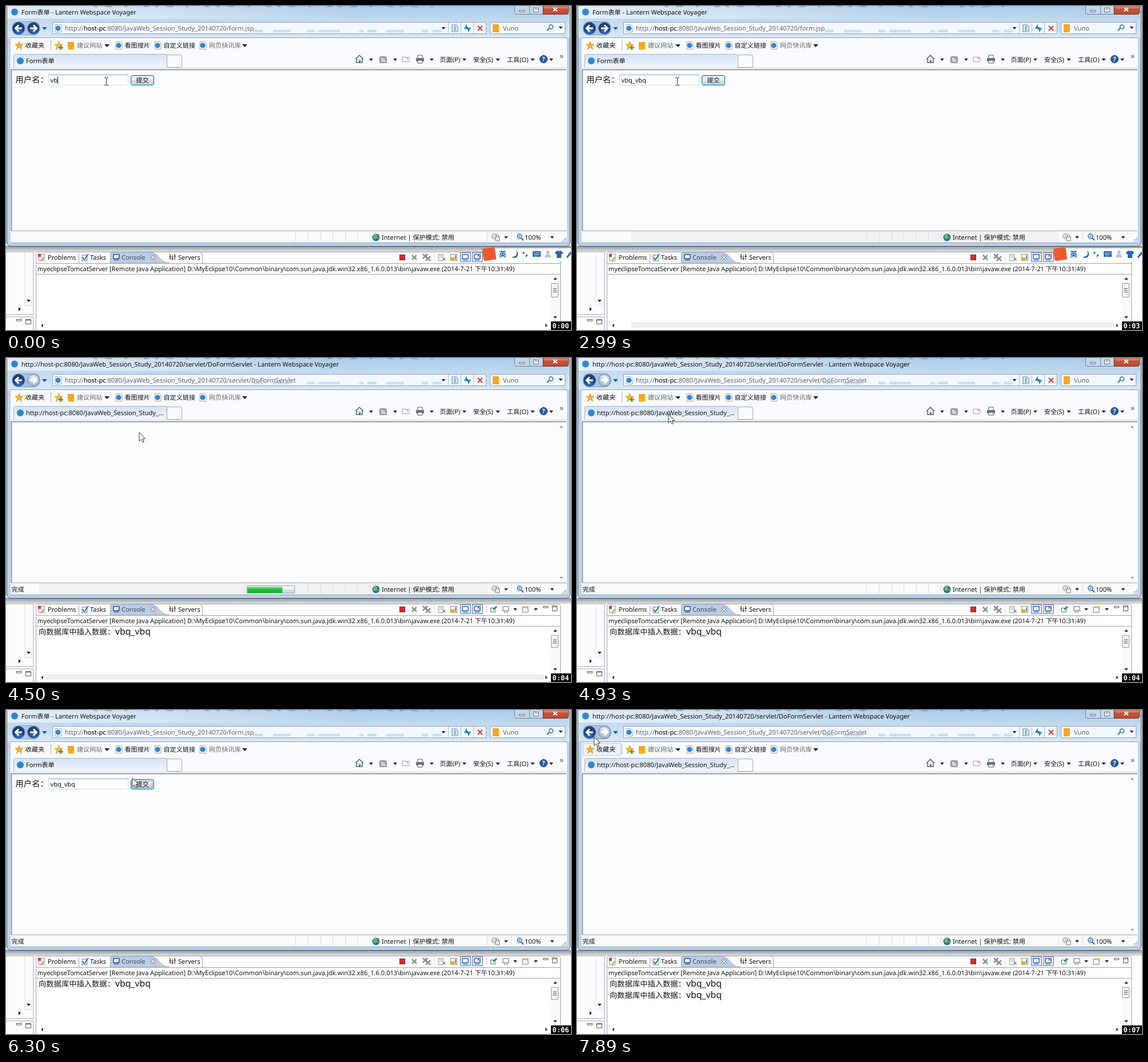
Animation of 988x567 px, one loop 8000 ms. Source, as an HTML page:

```html
<!DOCTYPE html>
<html lang="zh">
<head>
<meta charset="utf-8">
<title>Form表单</title>
<style>
html, body { margin: 0; width: 100%; height: 100%; overflow: hidden; background: #fff; }
svg { display: block; width: 100vw; height: 100vh; }
text { font: 11.1px "Noto Sans", "Noto Sans CJK SC", "Noto Sans CJK", sans-serif; fill: #111; white-space: pre; text-rendering: geometricPrecision; }
.dim, .dim text { fill: #686868; }
.line { fill: none; stroke: #9aa3ad; }
.pale { fill: none; stroke: #d9dde2; }
.log text { font-size: 13.3px; }
.log tspan { font-size: 15.8px; }
</style>
</head>
<body>
<svg viewBox="0 0 988 567">
<defs>
  <linearGradient id="glass" x2="0" y2="1"><stop stop-color="#abcae8"/><stop offset=".45" stop-color="#c3daf0"/><stop offset="1" stop-color="#d8e7f6"/></linearGradient>
  <linearGradient id="glow"><stop stop-color="#fff" stop-opacity=".65"/><stop offset="1" stop-color="#fff" stop-opacity="0"/></linearGradient>
  <linearGradient id="tabFill" x2="0" y2="1"><stop stop-color="#d3e3f6"/><stop offset="1" stop-color="#f1f6fd"/></linearGradient>
  <linearGradient id="grey" x2="0" y2="1"><stop stop-color="#f6f8fa"/><stop offset=".5" stop-color="#e9edf1"/><stop offset=".55" stop-color="#d5dce3"/><stop offset="1" stop-color="#cdd7e1"/></linearGradient>
  <linearGradient id="red" x2="0" y2="1"><stop stop-color="#e0a090"/><stop offset=".4" stop-color="#c9503c"/><stop offset="1" stop-color="#c04a30"/></linearGradient>
  <linearGradient id="green" x2="0" y2="1"><stop stop-color="#a5eaa5"/><stop offset=".4" stop-color="#1fc335"/><stop offset="1" stop-color="#14b52a"/></linearGradient>
  <linearGradient id="shade" x2="0" y2="1"><stop stop-color="#8b929a"/><stop offset="1" stop-color="#e9ecef"/></linearGradient>
  <radialGradient id="ball" cy=".75"><stop stop-color="#3d86d8"/><stop offset=".55" stop-color="#1c4f9c"/><stop offset="1" stop-color="#1f3f78"/></radialGradient>
  <radialGradient id="paleBall" cy=".3"><stop stop-color="#f2f6fa"/><stop offset="1" stop-color="#aebfd2"/></radialGradient>
  <path id="star" d="M0-7 2-2 7-2 3 1.500 4.500 7 0 3.500-4.500 7-3 1.500-7-2-2-2Z" fill="#fbb52b" stroke="#d98a14" stroke-width=".8"/>
  <g id="page"><path d="M-5-6.500H3L6-4V6.500H-5Z" fill="#fff" stroke="#9aa9b8"/><circle r="4.500" fill="#2f86cf"/></g>
  <path id="cross" d="M-4-4 4 4M4-4-4 4" stroke="#8f8f8f" stroke-width="2.500"/>
  <path id="pointer" d="M0 0V15.500L3.600 12 6 17.300 8.300 16.300 6 11.200H10.500Z" fill="#fff" stroke="#222" stroke-width=".9"/>
  <g id="mon"><rect x="-5" y="-5" width="10" height="7" fill="#fff" stroke="currentColor" stroke-width="1.500"/><path d="M-4 4.500H4" stroke="currentColor" stroke-width="1.500"/></g>
</defs>

<!-- IDE panels -->
<rect y="420" width="988" height="11" fill="url(#shade)"/>
<path d="M0 430H48V540H0M0 544H48V567" fill="#fff" class="line" style="fill:#fcfcfe"/>
<path d="M33 431V524M33 524H47" class="pale"/>
<path d="M36 514h7l-3.500 4zM22 527v7l4-3.500z" fill="#222"/>
<path d="M18 548.500h9v2.500h-9zM34.500 548.500h9v8h-9zM34 550h10" fill="#fff" stroke="#555"/>
<path d="M52.500 567V435Q52.500 430.500 57 430.500H965Q969.500 430.500 969.500 435V567" fill="#fff" stroke="#97a3b4"/>
<path d="M53 450.500H969" class="line"/>
<path d="M182.500 450V434Q182.500 431 186 431H252C268 431 268 450 286 450Z" fill="#bccde4" stroke="#97a8c0"/>
<path d="M127.500 433V450M343.500 450V436Q343 431 338 431" class="line"/>
<path d="M53 469.500H969" class="line"/>
<g>
  <rect x="57" y="434" width="10" height="12" fill="#fff" stroke="#8693a6"/><rect x="56" y="434" width="5" height="5" fill="#d8382f"/><path d="M61 446 66 440" stroke="#c98a28" stroke-width="2"/>
  <rect x="133" y="436" width="9" height="10" fill="#eef4fd" stroke="#6a7fa5"/><path d="M134 440 137 444 144 434" fill="none" stroke="#2b5f9f" stroke-width="1.800"/>
  <use href="#mon" x="193" y="440" color="#2c4f8e"/>
  <path d="M253 436 261 444M261 436 253 444" stroke="#6f7f94" stroke-width="3.500"/><path d="M253 436 261 444M261 436 253 444" stroke="#fff" stroke-width="1.500"/>
  <path d="M287 434V444M291 436V445M295 434V444M285 439H289M289 442H293M293 438H297" stroke="#555" stroke-width="1.500"/>
  <text x="73" y="444">Problems</text><text x="147" y="444">Tasks</text><text x="202" y="444" style="fill:#33506f">Console</text><text x="301" y="444">Servers</text>
  <text x="55" y="464">myeclipseTomcatServer [Remote Java Application] D:\MyEclipse10\Common\binary\com.sun.java.jdk.win32.x86_1.6.0.013\bin\javaw.exe (2014-7-21 下午10:31:49)</text>
</g>
<g>
  <rect x="688.500" y="435.500" width="9" height="9" fill="#e02525" stroke="#a61c1c"/>
  <use href="#cross" x="714" y="440"/><use href="#cross" x="733" y="438"/><use href="#cross" x="738" y="442"/>
  <path d="M748.500 432V448" class="pale"/>
  <rect x="756.500" y="434.500" width="8" height="11" fill="#fff" stroke="#9a9a80"/><path d="M758 437H763M758 440H763" stroke="#8894a8"/><use href="#cross" transform="translate(766 443)scale(.6)"/>
  <rect x="777.500" y="434.500" width="11" height="11" fill="#fff" stroke="#8a8a70"/><rect x="777" y="440" width="7" height="6" fill="#d9a62c"/><path d="M786 436V444" stroke="#5d7eb0" stroke-width="2"/>
  <path d="M794.500 431.500H812.500V447.500H794.500ZM815.500 431.500H833.500V447.500H815.500Z" fill="#dfe6f0" stroke="#6d7b8e"/>
  <use href="#mon" x="803" y="440" color="#3c6db5"/><use href="#mon" x="824" y="440" color="#3c6db5"/><path d="M824 435 828 439M828 435 824 439" stroke="#d22"/>
</g>
<g id="tools">
  <path d="M840.500 432V448" class="pale"/>
  <rect x="847.500" y="437.500" width="8" height="7" fill="#fff" stroke="#49749b"/><path d="M852 440 858 435" stroke="#2b9a58" stroke-width="3"/>
  <use href="#mon" x="874" y="440" color="#8b98a8"/>
  <path d="M903 436H913V445H903Z" fill="#fff" stroke="#4a72ad"/><path d="M903 436H909M912 434V439" stroke="#e0a72c" stroke-width="2.500"/>
  <path d="M887 438h7l-3.500 4zM923 438h7l-3.500 4z" fill="#222"/>
  <path d="M939.500 434.500h8v2.500h-8zM955.500 433.500h8v9h-8zM955 435.500h9" fill="#fff" stroke="#555"/>
</g>
<rect x="953" y="471" width="14" height="81" fill="#f8f9fb"/>
<path d="M957 479h7l-3.500-4zM957 543h7l-3.500 4zM65 556v6l-4-3zM943 556v6l4-3z" fill="#333"/>
<rect id="thumb" x="953.500" y="485.500" width="12" rx="1.500" fill="#f1f3f5" stroke="#8e979f"/>
<path id="grip" d="M956.500 0H963M956.500 3H963M956.500 6H963" stroke="#555"/>
<g class="log"><text x="57" y="484">向数据库中插入数据：<tspan x="191">vbq_vbq</tspan></text><text x="57" y="504">向数据库中插入数据：<tspan x="191">vbq_vbq</tspan></text></g>

<!-- Browser window -->
<path d="M1.500 0V413Q1.500 420.500 9 420.500H979Q986.500 420.500 986.500 413V0Z" fill="#b9d3ec" stroke="#3e4f63"/>
<rect x="2" width="984" height="55" fill="url(#glass)"/>
<rect x="2" width="600" height="22" fill="url(#glow)"/>
<path d="M155 0H750" stroke="#6e8aa8" stroke-width="4" stroke-linecap="round" stroke-dasharray="3 17 9 25 2 31 6 14" opacity=".55"/>
<path d="M889.500 0V11Q889.500 14.500 893 14.500H939V0M915.500 0V14" fill="#c4d8ec" stroke="#68809b"/>
<path d="M939.500 0V14.500H980Q983.500 14.500 983.500 11V0Z" fill="url(#red)" stroke="#713226"/>
<path d="M897.500 7.500H907V10H897.500ZM922.500 3.500H931V10.500H922.500ZM925 6H929" fill="#fff" stroke="#55657a"/>
<path d="M957 3 964 9M964 3 957 9" stroke="#fff" stroke-width="2.200"/>
<circle cx="15" cy="10.500" r="6" fill="#2f86cf"/>
<text id="title" x="27" y="14.500"></text>
<path d="M11 39Q11 27.500 22 27.500H48Q59 27.500 59 39T48 50.500H22Q11 50.500 11 39" fill="#a9c4e0" stroke="#8098b4"/>
<circle id="back" cx="22" cy="39" r="10.500" stroke="#34517c"/>
<path d="M28 39H17M22 33.500 16.500 39 22 44.500" fill="none" stroke="#fff" stroke-width="3"/>
<circle id="forward" cx="48" cy="39" r="10.500" stroke="#6d86a6"/>
<path d="M42 39H53M48 33.500 53.500 39 48 44.500" fill="none" stroke="#fff" stroke-width="3"/>
<path d="M63 37h9l-4.500 5z" fill="#1d5a8d"/>
<rect x="81.500" y="28.500" width="758" height="20" fill="#f3f8fd" stroke="#8aa1ba"/>
<path d="M435 44H760" stroke="#c9dff3" stroke-width="5" stroke-linecap="round" stroke-dasharray="12 22 26 34 8 12 33 38 4 10"/>
<path d="M773.500 29V48M795.500 29V48M817.500 29V48" stroke="#a9bbcd"/>
<use href="#page" x="91" y="39"/>
<text x="103" y="43" class="dim">http://<tspan fill="#000">host-pc</tspan>:8080/JavaWeb_Session_Study_20140720/<tspan id="path"></tspan></text>
<path d="M780 33H787L790 36V45H780ZM782 38H788M782 42H788M785 34V44" fill="none" stroke="#4e91c8" stroke-width="1.200"/>
<path d="M802 40 805 35V38H809M812 38 809 43V40H805" fill="none" stroke="#2375b9" stroke-width="2"/>
<path d="M825 35 833 43M833 35 825 43" stroke="#d83a32" stroke-width="2"/>
<rect x="846.500" y="28.500" width="131" height="20" fill="#f3f8fd" stroke="#8aa1ba"/>
<rect x="851" y="32" width="11" height="14" fill="#f5a81c"/>
<text x="869" y="43" class="dim" font-style="italic">Vuno</text>
<path d="M946 43 950 39" stroke="#2773b5" stroke-width="2"/><circle cx="953" cy="36.500" r="3.500" fill="none" stroke="#2773b5" stroke-width="1.500"/>

<rect x="8" y="55" width="973" height="360" fill="#f9fbfe"/>
<path d="M8 55.500H981M8 414.500H981" stroke="#8c9fb4"/>
<path id="favHover" d="M10.500 58.500H76.500V79.500H10.500Z" fill="#edf3fa" stroke="#bccbdc"/>
<use href="#star" x="23" y="69"/>
<path d="M78.500 59V78" class="pale" style="stroke:#aab4c0"/>
<use href="#star" x="92" y="69"/><path d="M92 73H100M96 69V77" stroke="#3fa535" stroke-width="2.500"/>
<rect x="108" y="63" width="11" height="13" fill="#f5a81c"/>
<use href="#page" x="197" y="69"/><use href="#page" x="265" y="69"/><use href="#page" x="344" y="69"/>
<text x="34" y="73">收藏夹</text><text x="124" y="73" class="dim">建议网站</text><text x="207.500" y="73">看图搜片</text><text x="275.500" y="73">自定义链接</text><text x="355" y="73" class="dim">网页快讯库</text>
<path d="M8 108.500H981" class="pale"/>
<path d="M13.500 108V88Q13.500 84.500 17 84.500H278Q281.500 84.500 281.500 88V108" fill="url(#tabFill)" stroke="#9fb3ca"/>
<path d="M281.500 107.500V88Q281.500 85.500 284 85.500H305Q307.500 85.500 307.500 88V107.500Z" fill="#f8fafd" stroke="#9fabb9"/>
<circle cx="25" cy="96" r="6" fill="#2f86cf"/>
<text id="tab" x="35" y="100"></text>
<path d="M611 93 618 86 625 93M613 92V99H623V92" fill="#e8f0fa" stroke="#41689b" stroke-width="1.500"/><path d="M617 95H620V99H617Z" fill="#a4622c"/>
<rect x="653.500" y="88.500" width="12" height="11" rx="2" fill="#a5a8ab" stroke="#858585"/><path d="M656 92Q662 92 662 98M656 95Q659 95 659 98" fill="none" stroke="#fff" stroke-width="1.500"/>
<path d="M693 89.500H705V97.500H693Z" fill="#fff" stroke="#9aa0ab"/><path d="M702 91V93" stroke="#d66" stroke-width="2"/>
<path d="M720 91V86H728V91" fill="#fff" stroke="#555"/><path d="M717 91H731V97H717Z" fill="#6c757f"/><path d="M720 95H728V100H720Z" fill="#fff" stroke="#555"/>
<text x="758.500" y="97.500">页面(P)</text><text x="817" y="97.500">安全(S)</text><text x="876" y="97.500">工具(O)</text>
<circle cx="940" cy="93" r="6.500" fill="#2758a5" stroke="#183d79"/><text x="937.300" y="97" style="fill:#fff;font-weight:bold">?</text>
<text x="968" y="92" style="fill:#27598e;font-size:14px">»</text>
<path d="M635 92h7l-3.500 4zM677 92h7l-3.500 4zM741 92h7l-3.500 4zM798 92h7l-3.500 4zM856 92h8l-4 4zM917 92h8l-4 4zM950 92h7l-3.500 4zM172 67h9l-4.500 5zM413 67h9l-4.500 5zM761.500 37h7l-3.500 4zM966.500 36h7l-3.500 4zM871 403h7l-3.500 4zM951.500 403h7l-3.500 4z" fill="#222"/>
<rect x="9" y="111" width="971" height="282" fill="#fcfdff"/>
<path d="M9.500 393V111.500H980" fill="none" stroke="#777d84" stroke-width="1.500"/>
<path d="M9 393.500H980" stroke="#9b9fa5"/>

<g id="form">
  <text x="16.500" y="134" style="font-size:14.300px">用户名：</text>
  <rect x="74.500" y="120.500" width="139" height="18" fill="#fff" stroke="#c5dcee"/><path d="M74 120.500H214" stroke="#7ea6c6"/>
  <text id="field" x="77.500" y="133.500"></text>
  <path id="caret" d="M0 123V136" stroke="#000"/>
  <rect x="218.500" y="121.500" width="40" height="17" rx="2.500" fill="url(#grey)" stroke="#3d7290"/><rect x="219.500" y="122.500" width="38" height="15" rx="1.500" fill="none" stroke="#8bd0ee"/>
  <rect id="focus" x="221.500" y="124.500" width="34" height="11" fill="none" stroke="#555" stroke-dasharray="1 1"/>
  <text x="227.500" y="133.500">提交</text>
</g>
<path id="bars" d="M968 122h6l-3-3.500zM968 383h6l-3 3.500z" fill="#8b9097"/>
<g id="tint">
  <rect y="395" height="19" fill="#f1f0f2"/><rect y="553" height="10" fill="#eeeeef"/>
</g>
<path d="M506.500 396V413M528.500 396V413M550.500 396V413M571.500 396V413M593.500 396V413M614.500 396V413M636.500 396V413M841.500 396V413M883.500 396V413" class="pale"/>
<text id="done" x="9.500" y="408.500">完成</text>
<g id="progress"><path d="M417.500 396V413" class="pale"/><rect x="421.500" y="398.500" width="83" height="13" rx="1.500" fill="url(#grey)" stroke="#a3a8ad"/><rect id="fill" x="422" y="400" height="11" fill="url(#green)"/></g>
<circle cx="647" cy="405" r="6.500" fill="#2b69ad"/><path d="M643 401Q647 397 649 402T645 408Q641 406 643 401M650 405 653 404 650 409Z" fill="#6fbd57"/>
<text x="657" y="408.500">Internet | 保护模式: 禁用</text>
<circle cx="854" cy="403" r="4.500" fill="#d7dce1" stroke="#8a9097"/><path d="M856 404H863V411H856ZM857.500 404V401Q859.500 398 861.500 401V404" fill="#f3f3f3" stroke="#777"/>
<circle cx="898" cy="403" r="4" fill="#e6f1fc" stroke="#2d6cae" stroke-width="1.500"/><path d="M901 406 905 410" stroke="#6b4b2d" stroke-width="2"/><path d="M896 403H900M898 401V405" stroke="#2d6cae"/>
<text x="907" y="408.500">100%</text>
<path d="M972 412h2M975 412h2M978 412h2M975 409h2M978 409h2M978 406h2" stroke="#a5b1bf" stroke-width="2"/>

<!-- Input method bar -->
<g id="ime" fill="#2468b8">
  <rect x="838" y="424" width="150" height="22" fill="#fdfeff"/>
  <rect x="834" y="423" width="22" height="22" rx="3" transform="rotate(-8 845 434)" fill="#f0592a"/>
  <text x="862" y="439" style="font-size:13px;fill:#2468b8;font-weight:bold">英</text>
  <path d="M892 428Q896 439 884 439Q892 444 895 436Q896 431 892 428"/>
  <circle cx="905" cy="432" r="1.800"/><path d="M909 435H912V437L909 440Z"/>
  <rect x="921" y="429" width="14" height="10" rx="1"/><path d="M923 432H933M923 434.500H933M925 437H931" stroke="#fff" stroke-dasharray="2 1"/>
  <path d="M942 440Q942 434 947.500 434T953 440Z" fill="#bcc6d2"/><circle cx="947.500" cy="431" r="3" fill="#bcc6d2"/>
  <path d="M961 430 965 428Q967 430 969 428L973 430 974 434H971V441H963V434H960Z"/>
  <path d="M981 440 988 431" stroke="#2468b8" stroke-width="3"/>
</g>
<rect x="953" y="552" width="35" height="15"/>
<text id="clock" x="955.500" y="563.500" style="font:bold 12px 'DejaVu Sans Mono',monospace;fill:#fff"></text>
<path id="beam" d="M172 125.500H174.500L175.500 126.500 176.500 125.500H179M175.500 126V137M172 138.500H174.500L175.500 137.500 176.500 138.500H179" fill="none" stroke="#222"/>
<use id="mouse" href="#pointer"/>
</svg>
<script>
const $ = id => document.getElementById(id);
const set = (id, attrs) => { for (const k in attrs) $(id).setAttribute(k, attrs[k]); };
const show = (id, on) => set(id, { visibility: on ? 'visible' : 'hidden' });
const lines = document.querySelectorAll('.log text');
const app = ' - Lantern Webspace Voyager';
const site = 'http://host-pc:8080/JavaWeb_Session_Study_';
const user = 'vbq_vbq';
const typed = [0, 0, 160, 1400, 1950, 2190, 2440];

const spans = [[3490, 4500, 8], [4660, 5570, 8], [5720, 6750, 9], [6890, 7890, 9]];
// pointer: time, x, y
const track = [[3490, 175, 131], [3780, 233, 130], [4660, 233, 130], [5430, 17, 36], [5840, 17, 36],
  [6235, 221, 119], [6400, 235, 130], [7130, 235, 130], [7890, 30, 47]];

function snap(t) {
  for (const [a, b, n] of spans) {
    const d = (b - a) / (n - 1);
    if (t >= a && t < b + d) return Math.min(b, a + Math.floor((t - a) / d + 1e-6) * d);
  }
  return t;
}

function mouseAt(t) {
  const i = track.findIndex(k => k[0] > t);
  if (i === 0) return track[0].slice(1);
  if (i < 0) return track[track.length - 1].slice(1);
  const [t0, x0, y0] = track[i - 1], [t1, x1, y1] = track[i];
  const p = (t - t0) / (t1 - t0);
  return [x0 + (x1 - x0) * p, y0 + (y1 - y0) * p];
}

function draw(now) {
  const t = snap(now % 8000);
  const sent = t > 4060, servlet = sent && t < 5840 || t >= 6890;
  const [x, y] = mouseAt(t);

  const full = site + '20140720/servlet/DoFormServlet';
  $('title').textContent = (servlet ? full : 'Form表单') + app;
  $('tab').textContent = servlet ? site + '...' : 'Form表单';
  $('path').textContent = servlet ? 'servlet/DoFormServlet' : 'form.jsp';
  set('back', { fill: Math.hypot(x - 22, y - 39) < 9 ? '#1b2c50' : 'url(#ball)' });
  set('forward', { fill: servlet ? 'url(#paleBall)' : 'url(#ball)' });
  show('favHover', x < 76 && y > 46 && y < 80);

  show('form', !servlet);
  const n = typed.filter(k => t >= k).length;
  $('field').textContent = user.slice(0, n);
  const caretX = [0, 0, 90.5, 96.5, 102.5, 108.5, 114.5, 121.5][n];
  set('caret', { transform: `translate(${caretX})`,
    display: t < 580 || t >= 980 && t < 2870 ? 'inline' : 'none' });
  set('focus', { display: t >= 3900 ? 'inline' : 'none' });

  show('bars', servlet);
  show('done', sent);
  const fill = 8 + (t - (t < 5840 ? 4067 : 6890)) * 0.123;
  show('progress', servlet && fill < 84);
  set('fill', { width: Math.max(0, Math.min(82, fill)) });

  const count = (t > 4200) + (t > 7180);
  lines.forEach((line, i) => line.setAttribute('visibility', i < count ? 'visible' : 'hidden'));
  const h = [24, 21, 18][count];
  set('thumb', { height: h });
  set('grip', { transform: `translate(0 ${482.5 + h / 2})` });
  show('tools', sent);
  show('ime', !sent);

  const left = t < 3490 ? 95 : 58;
  show('tint', t >= 980 && t < 4660 || t >= 6750 && t < 7250);
  const [status, bar] = $('tint').children;
  status.setAttribute('x', left);
  status.setAttribute('width', 840 - left);
  bar.setAttribute('x', left + (t < 3490 ? 0 : 13));
  bar.setAttribute('width', 940 - bar.getAttribute('x'));

  $('clock').textContent = '0:0' + Math.floor((t + 20) / 1000);
  show('beam', t < 3600);
  show('mouse', t >= 3600);
  set('mouse', { x, y });
}

function frame(now) {
  draw(now);
  requestAnimationFrame(frame);
}
draw(0);
requestAnimationFrame(frame);
</script>
</body>
</html>
```
